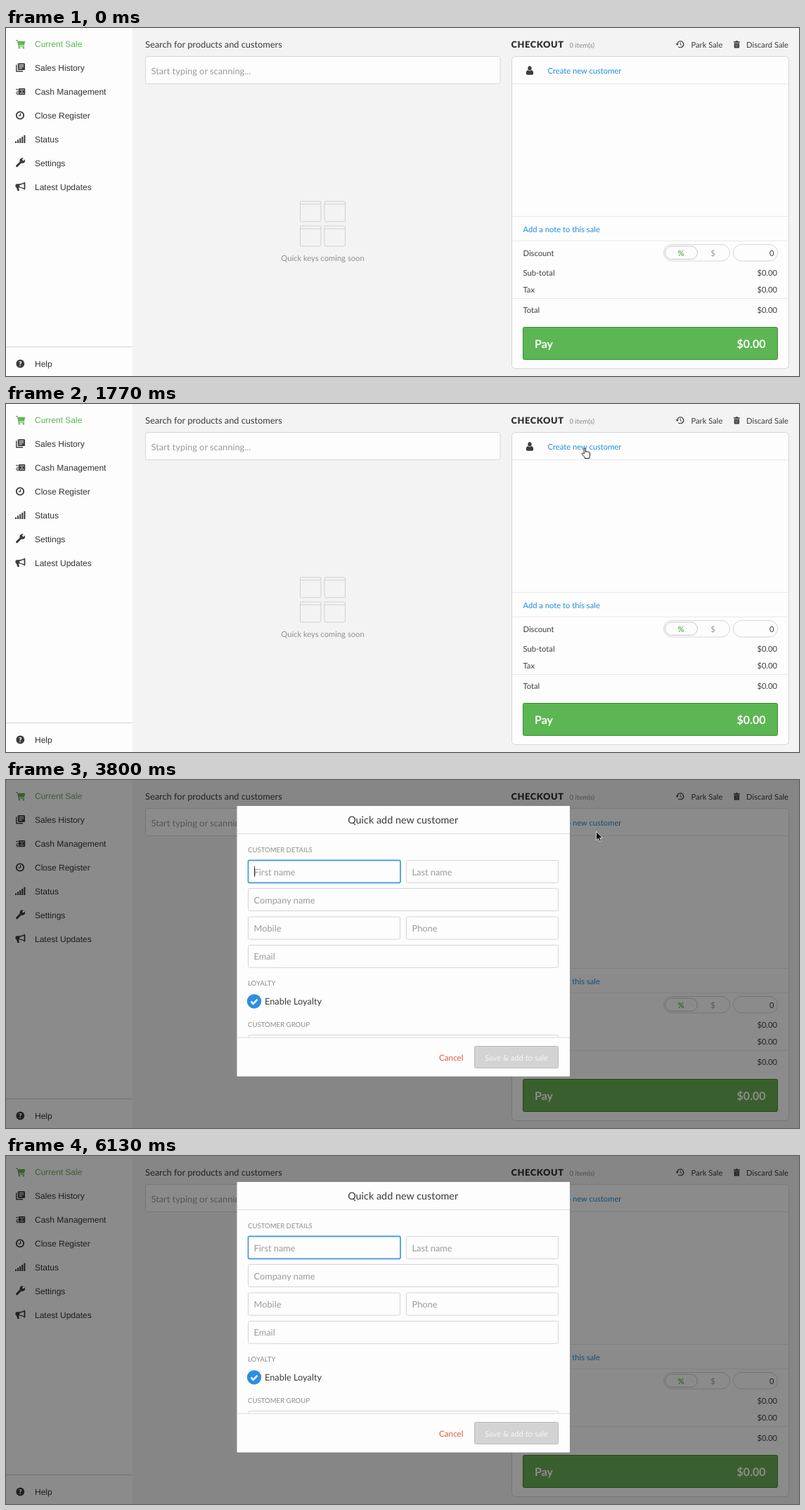
An HTML page for the animation above (6390 ms loop, 1128 px wide and 496 px high).

```html
<!DOCTYPE html>
<html lang="en">
<head>
<meta charset="utf-8">
<title>Checkout</title>
<style>
html, body { margin: 0; width: 100%; height: 100%; overflow: hidden; background: #f3f3f3; }
svg { display: block; width: 1128px; height: 496px; font-family: Lato, sans-serif; --green: #5cb653; --edge: #3f8b3b; }
svg.dull { --green: #6aac53; --edge: #467f35; }
text { text-rendering: geometricPrecision; }
.nav { font-family: "Liberation Sans", Arial, sans-serif; }
.green { fill: var(--green); }
.pay { fill: var(--green); stroke: var(--edge); }
.line { fill: none; stroke: #3b3b3b; }
</style>
</head>
<body>
<svg id="stage" viewBox="0 0 1128 496" xmlns="http://www.w3.org/2000/svg"></svg>
<script>
const LOOP = 6390;
const INK = '#3b3b3b', LINK = '#1f8ade', HINT = '#9b9b9b', PAPER = '#fdfdfd';
const stage = document.getElementById('stage');

const text = (x, y, str, size, fill = INK, attrs = '') =>
  `<text x="${x}" y="${y}" font-size="${size}" fill="${fill}" ${attrs}>${str}</text>`;
const box = (x, y, w, h, rx = 0, fill = PAPER, stroke = '#d6d6d6', attrs = '') =>
  `<rect x="${x}" y="${y}" width="${w}" height="${h}" rx="${rx}" fill="${fill}" stroke="${stroke}" ${attrs}/>`;
const rule = (x1, x2, y, color = '#e8e8e8') =>
  `<path d="M${x1} ${y}H${x2}" stroke="${color}"/>`;
const shape = (d, attrs = `fill="${INK}"`) => `<path d="${d}" ${attrs}/>`;
const dot = (x, y, r, attrs = `fill="${INK}"`) => `<circle cx="${x}" cy="${y}" r="${r}" ${attrs}/>`;
const END = 'text-anchor="end"', MID = 'text-anchor="middle"', WHITE = 'fill="none" stroke="#fff"';

function sidebar() {
  const items = ['Current Sale', 'Sales History', 'Cash Management', 'Close Register',
    'Status', 'Settings', 'Latest Updates'];
  const labels = items.map((s, i) =>
    text(41, 27 + i * 34, s, 12, i ? '#333' : '', i ? '' : 'class="green"')).join('');
  const bars = [0, 1, 2, 3, 4].map(i =>
    box(13 + i * 3.1, 161.5 - i * 2.2, 2, 2.5 + i * 2.2, 0, INK, 'none')).join('');
  return box(0, 0, 179.5, 496, 0, PAPER, 'none')
    + `<g class="nav">${labels}${text(41, 482.5, 'Help', 12, '#333')}</g>`
    + rule(0, 179.5, 454.5, '#d2d2d2')
    // cart
    + `<g class="green">${shape('M14 17h2.6l.5 1.7h10.2l-1.3 5.8h-7.4l.2 1h7.2v1.2h-8.3l-1.8-8.4H14z', '')}
       ${dot(18.8, 28.2, 1.2, '')}${dot(25, 28.2, 1.2, '')}</g>`
    // stacked pages
    + shape('M14.8 52.5v9.2H24', 'class="line" stroke-width="1.4"')
    + box(16.8, 50.3, 10.2, 9.6, 1, INK, 'none')
    + shape('M18.6 52.7h6.6M18.6 55h6.6M18.6 57.3h4.2', WHITE)
    // cash
    + shape('M14 87.5h3.5M15 90.2h3M14 92.6h3.5M15 94.8h3', 'class="line" stroke-width="1.1"')
    + box(18, 86, 9.2, 9.3, .8, INK, 'none')
    + shape('M19.4 88.2h6.6M19.4 93h6.6M22.7 89v3.2', WHITE + ' stroke-width=".8"')
    // clock
    + dot(20, 124.5, 5.2, 'class="line" stroke-width="1.8"')
    + shape('M20.6 121.5v3.4h-2.8', 'class="line" stroke-width="1.3"')
    + bars
    // wrench
    + shape('M15.6 196.6l6.6-6.6', 'class="line" stroke-width="3" stroke-linecap="round"')
    + dot(23.3, 189, 3.8) + shape('M23.8 188.5l4-4', `stroke="${PAPER}" stroke-width="2.6"`)
    // megaphone
    + shape('M26.6 219.4c1 0 .8 4.4.8 5.4s.2 6-.8 6c-2.8-2.5-5.8-3.2-8.8-3.3l1.3 4.6h-2.7l-1.5-4.6c-2 0-2-5.2.3-5.2 4.6 0 8.2-.5 11.4-2.9z')
    + shape('M25.6 221.8v6.6c-2-1.3-4-1.8-6.2-2v-2.7c2.4-.2 4.4-.8 6.2-1.9z', `fill="${PAPER}"`)
    // help
    + dot(20.3, 478.5, 5.9)
    + text(20.3, 482, '?', 9.6, '#fff', MID + ' font-weight="900"');
}

function search() {
  const tile = (x, y) => box(x, y, 29.5, 29, 2, 'none', '#d0d0d0') + rule(x, x + 29.5, y + 4, '#d0d0d0');
  return text(198, 27.5, 'Search for products and customers', 12.8)
    + box(198.5, 40.5, 504.5, 39, 3)
    + text(206.5, 65.5, 'Start typing or scanning...', 12.8, HINT)
    + tile(418.5, 247) + tile(453, 247) + tile(418.5, 282) + tile(453, 282)
    + text(450.5, 332, 'Quick keys coming soon', 11.2, '#8f8f8f', MID);
}

function checkout() {
  const sums = [['Sub-total', 352.5], ['Tax', 377], ['Total', 406]].map(([name, y]) =>
    text(735.5, y, name, 11.2) + text(1097, y, '$0.00', 11.2, INK, END)).join('');
  return text(718.5, 27.5, 'CHECKOUT', 12.8, '#2e2e2e', 'font-weight="900" letter-spacing=".6"')
    + text(801.5, 27.5, '0 item(s)', 9.6, '#8a8a8a')
    // park
    + shape('M954.8 23.2a4.5 4.5 0 1 1 1.5 3.4', 'class="line" stroke-width="1.2"')
    + shape('M952.6 22.5h4.4l-2.2 2.6z') + shape('M959.3 20.7v2.9l2 1.2', 'class="line"')
    + text(974.5, 27.5, 'Park Sale', 11.2)
    // trash
    + shape('M1035 19.3h2.6l.6-1h2.4l.6 1h2.6v1.4h-8.8zM1035.7 21.4h7.4v6c0 .6-.4 1-1 1h-5.4c-.6 0-1-.4-1-1z')
    + shape('M1037.8 22.6v4.5M1039.4 22.6v4.5M1041 22.6v4.5', 'stroke="#aaa" stroke-width=".6"')
    + text(1113, 27.5, 'Discard Sale', 11.2, INK, END)
    + box(719.5, 40.5, 394, 445, 5)
    + [79.5, 268.5, 303.5, 385.5].map(y => rule(720, 1113, y)).join('')
    // person
    + shape('M745 54.3c3.6 0 3.6 6 0 6.3-3.6-.3-3.6-6.3 0-6.3zM742.3 60c1.6 1.5 3.8 1.5 5.4 0 2 .4 2.5 3 2.4 4.8 0 1.2-.8 1.9-1.9 1.9h-6.4c-1.1 0-1.9-.7-1.9-1.9-.1-1.8.4-4.4 2.4-4.8z')
    + text(770.5, 64.7, 'Create new customer', 11.2, LINK)
    + text(735.5, 291, 'Add a note to this sale', 11.2, LINK)
    + text(735.5, 325, 'Discount', 11.2)
    + box(935.5, 308.5, 94, 23.5, 11.7) + box(937.5, 311, 46, 18.5, 9.2, PAPER, '#c6c6c6')
    + text(960, 325, '%', 11.2, '', 'class="green" font-weight="700" ' + MID)
    + text(1005.5, 325, '$', 11.2, '#999', MID)
    + box(1034.5, 308.5, 63, 23.5, 11.7) + text(1092.5, 325, '0', 11.2, INK, END)
    + sums
    + '<rect class="pay" x="735.5" y="426.5" width="362" height="46" rx="2"/>'
    + text(752, 455.7, 'Pay', 16, '#fff', 'font-weight="700"')
    + text(1080.5, 455.7, '$0.00', 16, '#fff', 'font-weight="700" ' + END);
}

function dialog() {
  const field = (x, y, w, name) => box(x, y, w, 32, 2) + text(x + 8, y + 21, name, 12.8, HINT);
  const head = (y, s) => text(344, y, s, 9.6, '#8c8c8c');
  return box(0, 0, 1128, 496, 0, 'rgba(0,0,0,.45)', 'none')
    + box(328.5, 37, 473.5, 385.5, 1, PAPER, 'none')
    + text(564.7, 61.5, 'Quick add new customer', 14.4, INK, MID)
    + rule(328.5, 802, 76.5, '#dcdcdc')
    + head(102.5, 'CUSTOMER DETAILS')
    + field(344.5, 114.5, 216, 'First name')
    + box(344.5, 114.5, 216.5, 32, 2, 'none', '#4d9fe6', 'stroke-width="1.8"')
    + field(569.5, 114.5, 216, 'Last name')
    + field(344.5, 154.5, 441, 'Company name')
    + field(344.5, 195, 216, 'Mobile') + field(569.5, 195, 216, 'Phone')
    + field(344.5, 235.3, 441, 'Email')
    + head(293.3, 'LOYALTY')
    + dot(353, 315.5, 10.2, 'fill="#2b8ee3"')
    + shape('M348.5 315.7l3.2 3.2 5.8-6', WHITE + ' stroke-width="2.5"')
    + text(368, 320, 'Enable Loyalty', 12.8)
    + head(352, 'CUSTOMER GROUP')
    + shape('M344.5 367v-1.5q0-2 2-2h437q2 0 2 2v1.5', 'fill="none" stroke="#d6d6d6"')
    + rule(328.5, 802, 367, '#dcdcdc')
    + text(616, 399.7, 'Cancel', 11.7, '#dc5a34')
    + box(666.5, 379.5, 119, 31, 2, '#d3d3d3', '#b9b9b9')
    + text(726, 399.7, 'Save &amp; add to sale', 11.2, '#f6f6f6', MID)
    + '<path id="caret" d="M353.5 123v15" stroke="#333"/>';
}

stage.innerHTML = sidebar() + search() + checkout()
  + box(770, 51, 106, 19.5, 1, 'none', '#86bdf1', 'id="focus" stroke-width="2.4"')
  + `<g id="dialog">${dialog()}</g>`
  + '<g id="cursor">'
  + shape('M0 0V12.2L2.8 9.6 4.7 14 6.8 13.1 4.9 8.8H8.8Z', 'id="arrow" fill="#000" stroke="#fff" stroke-width=".8"')
  + shape('M-.7 7.5V.6C-.7-1 1.5-1 1.5.6V5C2 4 3.4 4 3.5 4.8 4.1 3.9 5.5 4.3 5.6 5.4 6.3 4.8 7.6 5.2 7.6 6.4V9.5C7.6 11 6.6 12 6.6 14H.5C.5 12-2.5 10-3.7 7.8-4.2 6.6-2.7 5.9-1.9 6.9Z', 'id="hand" fill="#fff" stroke="#000" stroke-width=".9"')
  + '</g>';

// pointer updates come in bursts: start, end, interval
const bursts = [[480, 480, 60], [690, 740, 50], [890, 1510, 57.5], [1570, 1620, 50], [1770, 1830, 60],
  [3350, 3980, 56.25], [4040, 4220, 60], [4460, 4940, 60], [5120, 5240, 60]];
// pointer path: time, x, y
const path = [[480, 1095.5, 456.5], [690, 1030, 350], [740, 963, 237], [890, 948, 219],
  [1120, 889.3, 147], [1510, 830, 69], [1620, 826, 64.5], [1770, 823, 63.5], [1830, 820.5, 62],
  [3300, 820.5, 62], [3800, 839.7, 73.6], [3980, 862, 101], [4040, 885, 131], [4220, 990, 255],
  [4460, 1004, 279], [4700, 1064, 408], [4940, 1093.3, 488], [5120, 1094, 492], [5240, 1095, 504]];
// times at which the caret turns on or off
const flips = [2790, 3170, 3700, 4220, 4700, 5120, 5590, 6130];

function snap(t) {
  let s = 0;
  for (const [from, to, gap] of bursts) {
    if (t >= from) s = from + gap * Math.min(Math.floor((t - from) / gap), Math.round((to - from) / gap));
  }
  return s;
}

function pointer(t) {
  const i = path.findIndex(p => p[0] > t);
  if (i < 1) return path[i < 0 ? path.length - 1 : 0].slice(1);
  const [t0, x0, y0] = path[i - 1], [t1, x1, y1] = path[i];
  const k = (t - t0) / (t1 - t0);
  return [x0 + (x1 - x0) * k, y0 + (y1 - y0) * k];
}

const part = id => document.getElementById(id);
const [focusRing, modal, caret, cursor, arrow, hand] =
  ['focus', 'dialog', 'caret', 'cursor', 'arrow', 'hand'].map(part);
const show = (el, on) => el.setAttribute('display', on ? 'inline' : 'none');
const within = (t, a, b) => t >= a && t < b;

function draw(t) {
  stage.classList.toggle('dull', !(t < 690 || within(t, 1570, 2250)));
  show(focusRing, within(t, 2250, 2790));
  show(modal, t >= 2790);
  show(caret, flips.filter(f => t >= f).length % 2);
  const [x, y] = pointer(snap(t));
  cursor.setAttribute('transform', `translate(${x} ${y})`);
  show(cursor, within(t, 480, 5240));
  const pointing = within(t, 480, 690) || within(t, 1570, 2610);
  show(hand, pointing);
  show(arrow, !pointing);
}

const start = performance.now();
function tick() {
  draw((performance.now() - start) % LOOP);
  requestAnimationFrame(tick);
}
tick();
</script>
</body>
</html>
```
